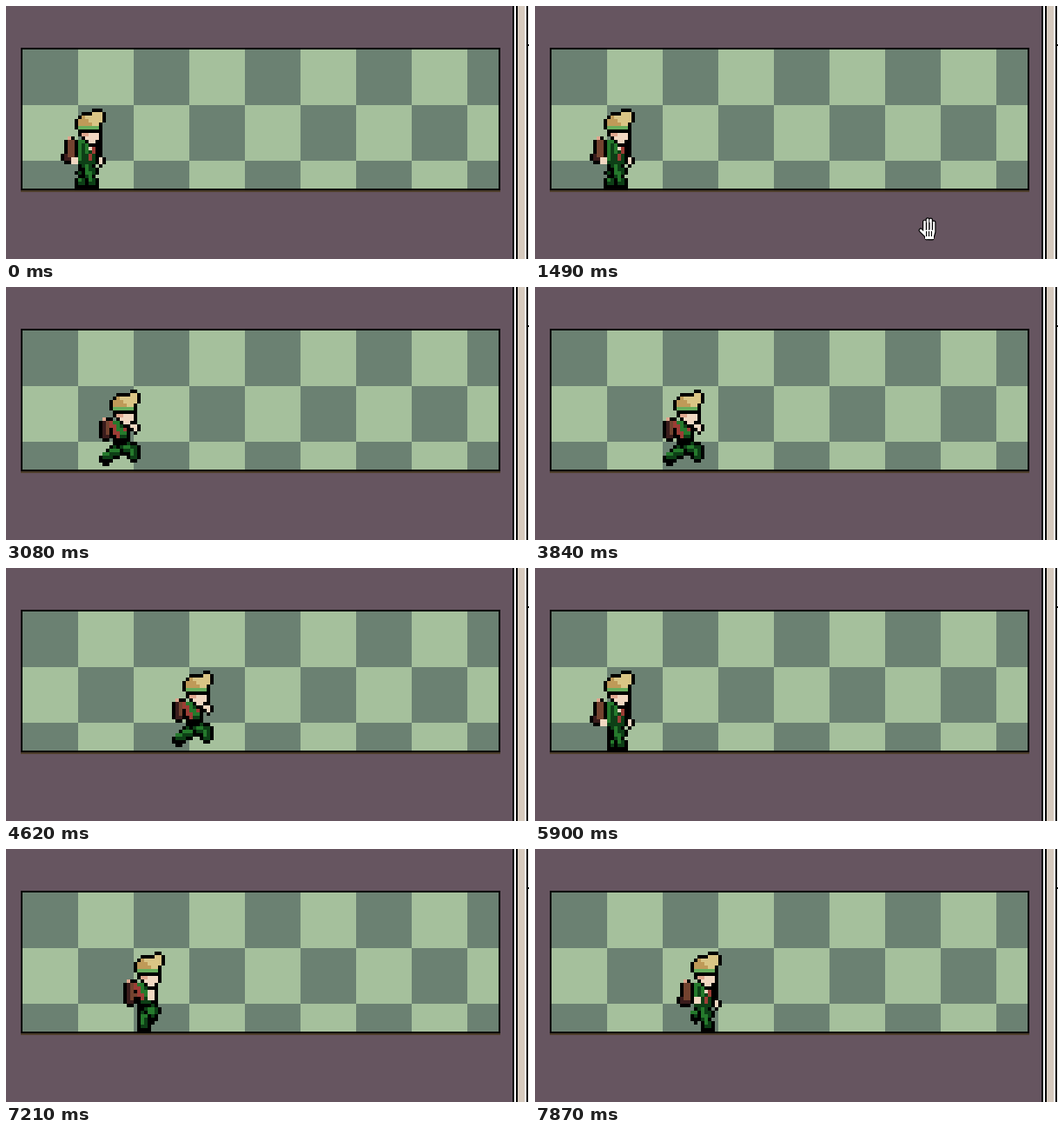
These frames come from a looping animation (602 px wide and 291 px high, 8000 ms). An HTML page with a canvas:

```html
<!DOCTYPE html>
<html lang="en">
<head>
<meta charset="utf-8">
<title>Walk cycle</title>
<style>
  html, body { margin: 0; width: 100%; height: 100%; overflow: hidden; background: #665560; }
  canvas { display: block; }
</style>
</head>
<body>
<canvas id="stage" width="602" height="291"></canvas>
<script>
const ctx = document.getElementById('stage').getContext('2d');
const LOOP = 8000, CELL = 4, HOME_X = 63, TOP_Y = 118;
const COLS = 14, ROWS = 23;

const C = {
  black: '#000', green: '#257a2c', dark: '#0d3f16', brown: '#74432f', maroon: '#3a1c1c',
  red: '#9c3d35', skin: '#f1d8c2', shade: '#dfa78f', light: '#dac585', tan: '#bf9a58', band: '#68ad5c'
};

function fill(color, x, y, w, h) {
  ctx.fillStyle = color;
  ctx.fillRect(x, y, w, h);
}

// Shapes are tests on whole cells
const box = (x0, y0, x1, y1) => (x, y) => x >= x0 && x <= x1 && y >= y0 && y <= y1;

function limb(radius, a, b) {
  const dx = b[0] - a[0], dy = b[1] - a[1], len2 = dx * dx + dy * dy || 1;
  return (x, y) => {
    const k = Math.max(0, Math.min(1, ((x - a[0]) * dx + (y - a[1]) * dy) / len2));
    return Math.hypot(x - a[0] - k * dx, y - a[1] - k * dy) <= radius;
  };
}

let originX = HOME_X;

function paint(color, inside) {
  for (let y = 0; y < ROWS; y++) {
    for (let x = 0; x < COLS; x++) {
      if (inside(x, y)) fill(color, originX + x * CELL, TOP_Y + y * CELL, CELL, CELL);
    }
  }
}

function outlined(color, inside) {
  paint(C.black, (x, y) =>
    inside(x - 1, y) || inside(x + 1, y) || inside(x, y - 1) || inside(x, y + 1));
  paint(color, inside);
}

// Feet of each pose; the knees follow from them
const poses = {
  stand: { feet: [[5.5, 21], [8.5, 21]] },
  close: { feet: [[6.5, 21], [8.5, 21]] },
  lift: { feet: [[5, 18], [8.5, 21]] },
  pass: { feet: [[6.5, 21], [9, 18]], side: true },
  stride: { feet: [[2.5, 19], [10.5, 18.5]], side: true, run: true }
};

function drawLegs(feet) {
  const hip = [7.2, 15];
  for (const [x, y] of feet) {
    const knee = [(hip[0] + x) / 2 + (21 - y) / 2, (hip[1] + y) / 2];
    const thigh = limb(1.4, hip, knee), shin = limb(0.8, knee, [x, y]);
    outlined(C.skin, limb(0.6, [x, y + 1], [x, y + 1]));
    outlined(C.dark, (cx, cy) => thigh(cx, cy) || shin(cx, cy));
    paint(C.green, limb(0.5, hip, [knee[0] - 0.5, knee[1]]));
    paint(C.green, limb(0.5, knee, [x - 0.5, y - 1]));
  }
}

function drawPack(pose) {
  const x = pose.side ? 2.6 : 2.2, bottom = pose.run ? 12 : 13.6;
  const bag = limb(1.3, [x + 0.3, 9.4], [x, bottom]);
  outlined(C.brown, bag);
  paint(C.maroon, (cx, cy) => bag(cx, cy) && (cx < x - 0.5 || cy > bottom));
  paint(C.shade, box(2, 8, 2, 8));
}

function drawFront(lifting) {
  paint(C.black, box(4, 9, 11, 14));
  paint(C.dark, box(5, 10, 9, 15));
  paint(C.green, limb(0.5, [5, 9], [5, 14]));
  paint(C.green, limb(0.6, [6, 8], [8, 14]));
  paint(C.skin, (x, y) => y > 7 && y < 12 && Math.abs(x - 8) < (12 - y) / 2);
  paint(C.red, limb(0.5, [9.5, 9], [8, 14]));
  paint(C.skin, lifting ? box(5, 13, 6, 14) : box(3, 14, 4, 15));
  outlined(C.skin, box(11, 14, 11, 15));
}

function drawSide(run) {
  outlined(C.dark, limb(1.8, [6.5, 10], [7, 13]));
  paint(C.green, limb(0.8, [5, 9], [7, 11.5]));
  paint(C.red, limb(0.5, [4, 9], [6, 13]));
  paint(C.red, limb(0.5, [9, 9], [8, 11]));
  if (run) {
    paint(C.black, box(5, 14, 9, 14));
    outlined(C.skin, limb(0.8, [10.5, 10], [11, 10.5]));
    paint(C.green, limb(0.6, [6, 11], [8, 12]));
  } else {
    paint(C.black, box(9, 9, 10, 14));
    paint(C.skin, box(8, 11, 9, 13));
  }
}

function drawHead(side) {
  const tip = side ? 10 : 9;
  const hair = (x, y) => y > 0 && y < 5 && x >= Math.max(5, tip - (tip - 6) * (y - 1)) && x < (y < 4 ? 12 : 11);
  const face = (x, y) => y > 5 && y < 10 && x >= Math.max(6, y - 1) && x <= (y < 9 ? 10 : 9);
  outlined(C.skin, face);
  paint(C.shade, (x, y) => face(x, y) && x < 8 && x + y < 15);
  outlined(C.band, box(5, 5, 10, 5));
  outlined(C.tan, hair);
  paint(C.light, (x, y) => hair(x, y) && x > y + 4);
  paint(C.band, box(5, 5, 10, 5));
}

function drawFigure(name) {
  const pose = poses[name];
  drawPack(pose);
  drawLegs(pose.feet);
  if (pose.side) drawSide(pose.run);
  else drawFront(name === 'lift');
  drawHead(pose.side);
}

// A full cycle is two half strides of eight steps, each ending in a lunge
const STEP = 98, WALK_TIME = 25 * STEP, WALK_STARTS = [2460, 5900];
const STRIDE = ['close', 'close', 'close', 'lift', 'lift', 'pass', 'stride', 'stand'];

function travel(step) {
  const h = step % 8, half = Math.floor(step / 8);
  const lunge = Math.max(0, Math.min(1, (h - 4) / 2));
  return 10.5 * half + (half % 2) / 2 + h + Math.floor((4 - half % 2) * lunge);
}

function drawWalker(t) {
  const start = WALK_STARTS.find(s => t >= s && t < s + WALK_TIME);
  let name = 'stand';
  originX = HOME_X;
  if (start !== undefined) {
    const step = Math.floor((t - start) / STEP);
    name = STRIDE[step % 8];
    originX += travel(step) * CELL;
  }
  drawFigure(name);
}

function drawBoard() {
  fill('#665560', 0, 0, 602, 291);
  fill('#4d3d2b', 17, 212, 552, 2);
  fill('#000', 17, 48, 552, 164);
  for (let row = 0; row < 3; row++) {
    for (let col = 0; col < 9; col++) {
      const x = 19 + col * 64, y = 50 + row * 64;
      fill((row + col) % 2 ? '#a5c09c' : '#6b8172', x, y, Math.min(64, 567 - x), Math.min(64, 210 - y));
    }
  }
}

function drawEdge() {
  fill('#fff', 583, 0, 19, 291);
  for (const x of [583, 587, 599]) fill('#000', x, 0, 2, 291);
  fill('#d6cabe', 589, 0, 8, 291);
  fill('#000', 601, 44, 1, 2);
}

function strokeLines(lines, color, width) {
  ctx.strokeStyle = color;
  ctx.lineWidth = width;
  ctx.beginPath();
  for (const [x1, y1, x2, y2] of lines) {
    ctx.moveTo(x1, y1);
    ctx.lineTo(x2, y2);
  }
  ctx.stroke();
}

function drawHand(x, y) {
  const lines = [[3, 15, 8, 20]], creases = [];
  for (let i = 0; i < 4; i++) {
    const fx = 7.5 + 3.5 * i, top = 2.6 + 1.3 * (i - 1.4) ** 2;
    lines.push([fx, top, fx, 17], [fx, 17, 10 + 2 * i, 24]);
    if (i < 3) creases.push([fx + 2, 6, fx + 2, 14], [9.5 + 3 * i, 16, 9.5 + 3 * i, 22]);
  }
  ctx.save();
  ctx.translate(x, y);
  ctx.lineCap = 'round';
  strokeLines(lines, '#000', 5);
  strokeLines(lines, '#fff', 2.6);
  fill('#fff', 8, 15, 10, 10);
  ctx.lineCap = 'butt';
  strokeLines(creases, '#000', 1);
  ctx.restore();
}

function drawCursor(t) {
  if (t < 860 || t >= 1690) return;
  if (t < 1490) {
    const k = Math.min(10, Math.floor((t - 860) / 38)) / 10;
    const rest = (1 - k) ** 2;
    drawHand(Math.round(441 + 36 * rest), Math.round(243 + 44 * rest));
  } else {
    const k = Math.ceil((t - 1509) / 60);
    drawHand(441 + 5 * k, 243 + 13 * k);
  }
}

function frame(t) {
  drawBoard();
  drawEdge();
  drawWalker(t);
  drawCursor(t);
}

const begin = performance.now();
function tick() {
  frame((performance.now() - begin) % LOOP);
  requestAnimationFrame(tick);
}
tick();
</script>
</body>
</html>
```
